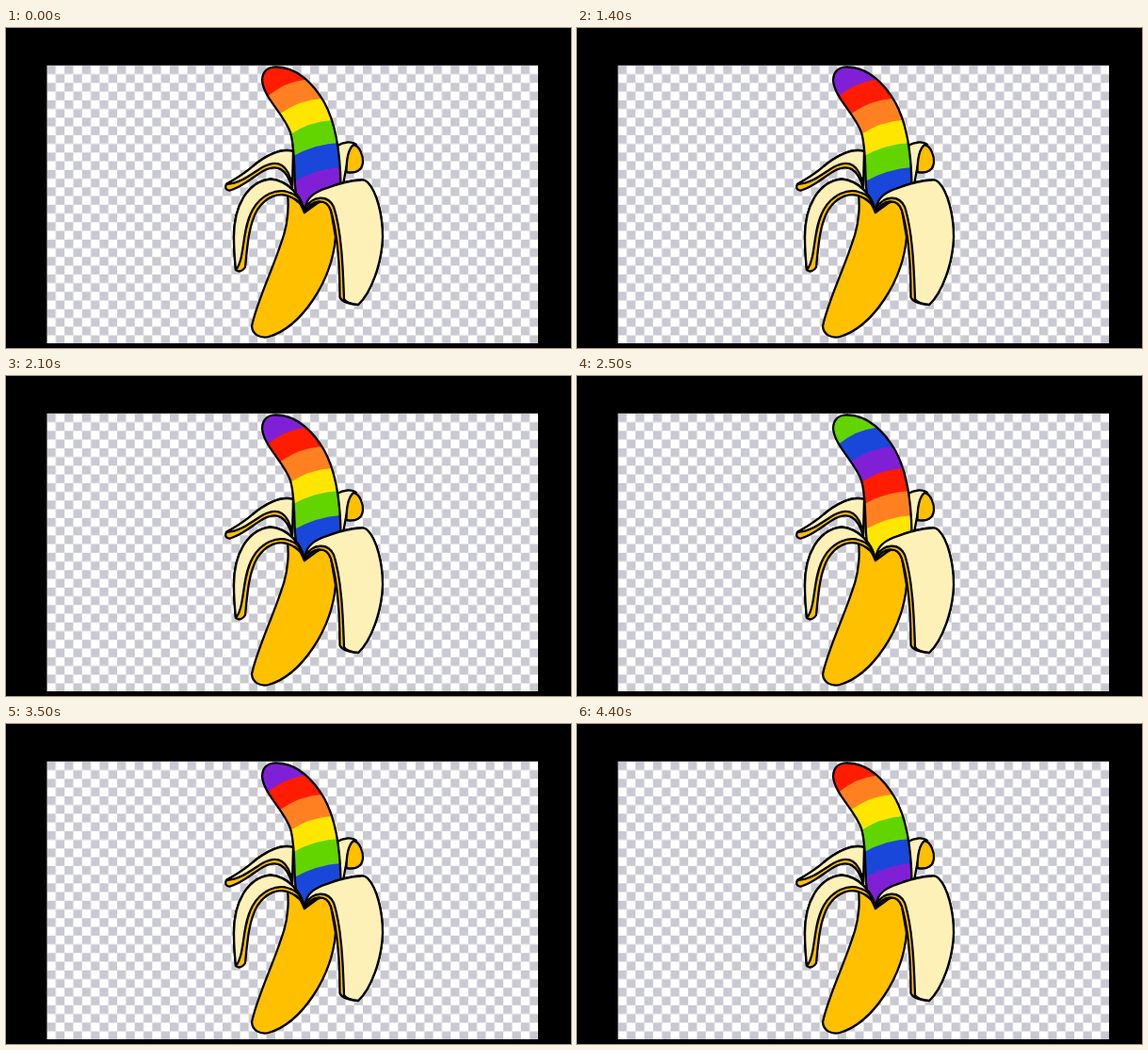
Recreate the animation shown at these times as an HTML page. Size 600 by 340 pixels, loop 4500 ms.

```html
<!DOCTYPE html>
<html lang="en">
<head>
<meta charset="utf-8">
<title>Rainbow banana</title>
<style>
html, body { margin: 0; width: 100%; height: 100%; overflow: hidden; background: #000; }
svg { display: block; }
.ink { stroke: #000; stroke-width: 2.3; stroke-linejoin: round; stroke-linecap: round; }
.peel { fill: #ffc000; }
.cream { fill: #fdf1b8; }
.line { fill: none; }
</style>
</head>
<body>
<svg width="600" height="340" viewBox="0 0 600 340">
  <defs>
    <pattern id="checker" x="43.5" y="39.8" width="18.64" height="18.5" patternUnits="userSpaceOnUse">
      <path fill="#c9c9d1" d="M0 0H18.64V18.5H0Z"/>
      <path fill="#fff" d="M9.32 0H18.64V9.25H9.32ZM0 9.25H9.32V18.5H0Z"/>
    </pattern>
    <path id="fruit" d="M272 56C272 46 278 41 288 41.500C310 42 327 60 338 79C349 99 355 130 355.500 168L317 196L308 177C305 158 308 132 302 111C295 91 274 75 272 56Z"/>
    <clipPath id="inside"><use href="#fruit"/></clipPath>
  </defs>
  <path fill="url(#checker)" d="M43.500 39.800H565V335H43.500Z"/>

  <!-- rear peels -->
  <path class="ink cream" d="M352 125C358 121 367 120 372 124C364 131 362 143 358 167H352Z"/>
  <path class="ink peel" d="M369 124C376 125 379.500 137 379 143C378 151 372 155 361.500 153C361.500 141 363 129 369 124Z"/>
  <path class="ink peel" d="M305 131C292 127 275 136 262 147C252 156 241 162 234 166C232 170 234 173 238 172.500C251 169 261 159 273 152C288 144 298 149 304 170Z"/>
  <path class="ink cream" d="M305 131C292 127 275 136 262 147C252 156 241 162 234 166C250 165 262 154 273 147.500C289 139 300 145 304 168Z"/>

  <!-- skin -->
  <path class="ink peel" d="M299 176C301 195 298 213 292 229C282 259 265 295 261 317C262 326 270 330 279 328C313 318 346 270 350 222L343 182L317 190Z"/>

  <g id="bands" clip-path="url(#inside)"></g>
  <use href="#fruit" class="ink line"/>

  <!-- front peels -->
  <path class="ink peel" d="M317 196C315 179 299 162 281 160.500C256 163 242 190 242 222C242 235 243 247 244 257C247 260 252 258 254 254C256 236 257 210 267 193C277 178 291 174.500 301 179C310 182 315 187 317 196Z"/>
  <path class="ink cream" d="M316 192C313 178 299 162 281 160.500C256 163 242 190 242 222C242 235 243 247 244 257C254 246 250 214 262 193C271 177 288 170 300 174.500C309 177 314 183 316 192Z"/>
  <path class="ink peel" d="M317 196C318 182 327 174 341 170C354 165 367 162 377 161.500C380 161 382 162 384 164C394 174 400 200 400 222C399 250 388 281 374 294C366 293 357 292 354.500 286C354.500 263 353 222 345 194C340 180 325 182 317 196Z"/>
  <path class="ink cream" d="M318 191C319 180 328 174 341 170C354 165 367 162 377 161.500C380 161 382 162 384 164C394 174 400 200 400 222C399 250 388 281 374 294C367 293 361 292 359 288C358 263 357 217 348 190C342 177 326 178 318 191Z"/>
</svg>
<script>
const colors = ['#ff1c00', '#ff8020', '#ffe600', '#62d400', '#1947d9', '#8020d6'];
// Upper edge of each band: left x, y and right x, y
const edges = [
  [260, 30, 360, 30], [277, 73, 317, 55], [291, 91, 335, 75],
  [300, 114, 346, 98], [303, 137, 355, 122], [304, 164, 358, 148]
];
const bands = edges.map(([x1, y1, x2, y2]) => {
  const band = document.createElementNS('http://www.w3.org/2000/svg', 'path');
  const midX = (x1 + x2) / 2, midY = (y1 + y2) / 2 - 7;
  band.setAttribute('d', `M${x1} ${y1}Q${midX} ${midY} ${x2} ${y2}H400V210H260Z`);
  document.getElementById('bands').append(band);
  return band;
});

function draw(now) {
  // Colours climb one band per 120 ms, shown on a 100 ms clock
  const time = Math.floor(now % 4500 / 100) * 100;
  const shift = Math.floor((time + 30) / 120);
  bands.forEach((band, i) => band.setAttribute('fill', colors[(i + shift) % 6]));
  requestAnimationFrame(draw);
}
draw(performance.now());
</script>
</body>
</html>
```
